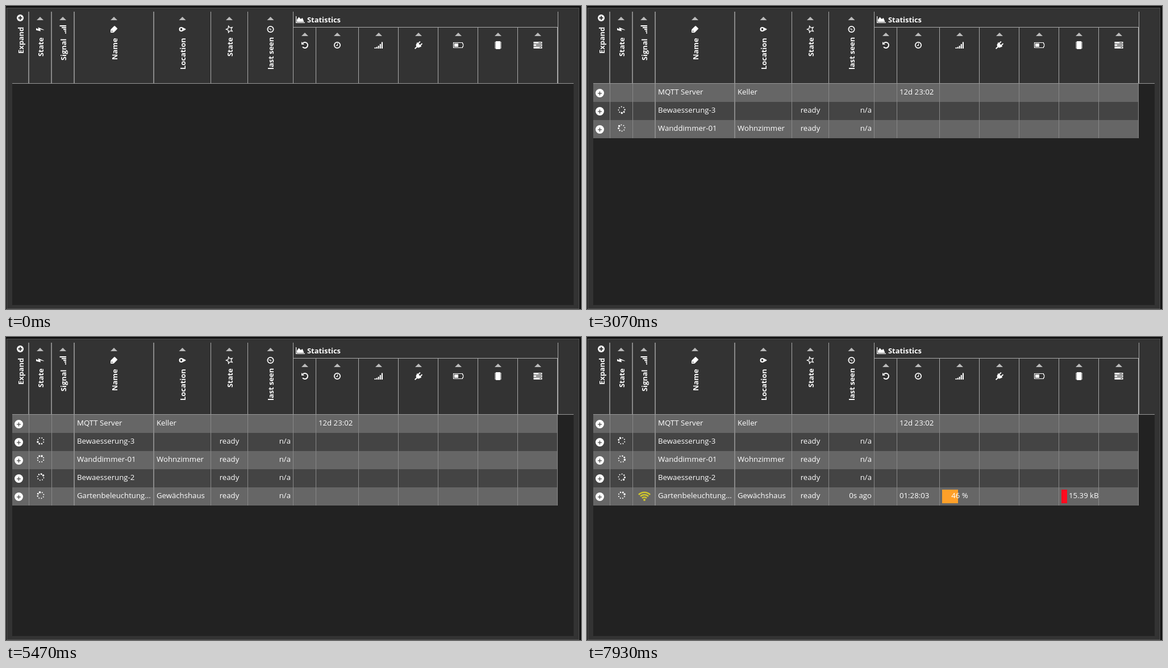
Recreate the animation shown at these times as an HTML page with a canvas. Size 1012 by 534 pixels, loop 8000 ms.

```html
<!DOCTYPE html>
<html lang="en">
<head>
<meta charset="utf-8">
<title>Device table</title>
<style>
html, body { margin: 0; width: 100%; height: 100%; overflow: hidden; background: #111; }
canvas { display: block; }
</style>
</head>
<body>
<canvas id="stage" width="1012" height="534"></canvas>
<script>
const ctx = document.getElementById('stage').getContext('2d');
const LOOP = 8000, TICK = 200 / 3, SPIN = 2000, TAU = Math.PI * 2;
const PLAIN = '13.2px "Open Sans", "Noto Sans", sans-serif';
const BOLD = 'bold 12.9px "Open Sans", "Noto Sans", sans-serif';
const ROW_H = 32, TOP = 137;
const LINES = [40, 80, 120, 260, 360, 425, 505, 545, 620, 690, 760, 830, 900, 970];
const UPDATE = 102; // tick at which live values arrive

// Each row appears at its own tick
const rows = [
  { at: 1, name: 'MQTT Server', place: 'Keller', uptime: '12d 23:02' },
  { at: 5, name: 'Bewaesserung-3', device: true },
  { at: 24, name: 'Wanddimmer-01', place: 'Wohnzimmer', device: true },
  { at: 51, name: 'Bewaesserung-2', device: true },
  { at: 57, name: 'Gartenbeleuchtung...', place: 'Gewächshaus', device: true, live: true }
];

function box(x, y, w, h, color) {
  ctx.fillStyle = color;
  ctx.fillRect(x, y, w, h);
}

function text(str, x, y, align = 'left', font = PLAIN) {
  ctx.font = font;
  ctx.textAlign = align;
  ctx.fillStyle = '#fff';
  ctx.fillText(str, x, y);
}

function dot(x, y, r, color = '#fff') {
  ctx.fillStyle = color;
  ctx.beginPath();
  ctx.arc(x, y, r, 0, TAU);
  ctx.fill();
}

function poly(points, color = '#fff') {
  ctx.fillStyle = color;
  ctx.beginPath();
  points.forEach(([x, y]) => ctx.lineTo(x, y));
  ctx.closePath();
  ctx.fill();
}

function stroke(path, width, color = '#fff') {
  ctx.strokeStyle = color;
  ctx.lineWidth = width;
  ctx.stroke(new Path2D(path));
}

function place(x, y, turn, draw) {
  ctx.save();
  ctx.translate(x, y);
  ctx.rotate(turn);
  draw();
  ctx.restore();
}

// Icons are drawn around their own centre
const icons = {
  bolt() {
    poly([[-1.4, -7], [2, -7], [.3, -2.8], [3.6, -3.5], [-1, 7], [-1.6, 6.5], [.1, .1], [-3.6, 1]]);
  },
  signal() {
    [2, 3, 5, 8, 11.5].forEach((h, i) => box(-7.5 + i * 3.1, 6 - h, 2.1, h, '#fff'));
  },
  tag() {
    ctx.fillStyle = '#fff';
    ctx.fill(new Path2D('M-6 -5Q-6 -6 -5 -6H-1.7Q-.6 -6 .2 -5.2L5.8 .4Q6.4 1 5.8 1.7L1.7 5.8Q1 6.4 .4 5.8L-5.2 .2Q-6 -.6 -6 -1.7Z'));
    dot(-3.5, -3.5, 1, '#333');
  },
  marker() {
    ctx.fillStyle = '#fff';
    ctx.fill(new Path2D('M-4 -2A4 4 0 0 1 4 -2Q4 -1 3.7 -.5L.8 5.5Q0 6.6 -.8 5.5L-3.7 -.5Q-4 -1 -4 -2Z'));
    dot(0, -2, 1.9, '#333');
  },
  star() {
    ctx.beginPath();
    for (let i = 0; i < 10; i++) {
      const r = i % 2 ? 2.8 : 6, a = i * TAU / 10 - TAU / 4;
      ctx.lineTo(Math.cos(a) * r, Math.sin(a) * r + .4);
    }
    ctx.closePath();
    ctx.strokeStyle = '#fff';
    ctx.lineWidth = 1.3;
    ctx.stroke();
  },
  clock() {
    stroke('M5.2 0A5.2 5.2 0 1 1 -5.2 0A5.2 5.2 0 1 1 5.2 0', 1.7);
    stroke('M.5 -3.2V.6H-2.3', 1.1);
  },
  plus() {
    dot(0, 0, 6);
    box(-3.5, -1, 7, 2, '#333');
    box(-1, -3.5, 2, 7, '#333');
  },
  undo() {
    stroke('M-3.7 -3.4A5 5 0 1 1 -3.9 3.1', 1.9);
    poly([[-6, -6], [-6, -1], [-1, -1]]);
  },
  plug() {
    ctx.rotate(TAU / 8);
    box(-5, -2.2, 10, 2, '#fff');
    ctx.fillStyle = '#fff';
    ctx.fill(new Path2D('M-4.2 -1.5H4.2V0A4.2 4.2 0 0 1 1 4.2V9H-1V4.2A4.2 4.2 0 0 1 -4.2 0Z'));
    stroke('M-2.5 -1.5V-6.6M2.5 -1.5V-6.6', 1.9);
  },
  battery() {
    stroke('M-8.5 -4.5H7.5V-2.2H8.7V2.2H7.5V4.5H-8.5Z', 1.1);
    box(-7, -3, 7, 6, '#fff');
  },
  chip() {
    box(-4, -7, 8, 14, '#fff');
    for (let y = -5.5; y < 6; y += 2) box(-6, y, 12, 1, '#fff');
  },
  server() {
    for (let i = 0; i < 3; i++) {
      const y = -6 + i * 4.3;
      box(-7.5, y, 15, 3.3, '#fff');
      box([1, -3, 3][i], y + 1.1, [5, 9, 3][i], 1.1, '#333');
    }
  },
  chart() {
    stroke('M-7.4 -6V5.4H8', 1.2);
    poly([[-6, 4], [-6, 0], [-2.6, -4.5], [.8, -1], [3.8, -3], [6.5, 4]]);
  }
};

function icon(name, x, y, turn = 0) {
  place(x, y, turn, icons[name]);
}

function arrow(x, y) {
  poly([[x - 6, y + 6], [x, y], [x + 6, y + 6]], '#bbb');
}

function upright(label, x, y) {
  place(x, y, -TAU / 4, () => text(label, 0, 0, 'left', BOLD));
}

function frame() {
  box(0, 0, 1012, 534, '#111');
  box(1, 3, 1008, 531, '#505050');
  box(2, 4, 1006, 529, '#333');
  box(11, TOP, 988, 390, '#222');
  box(11, 136, 988, 1, '#999');
}

function header() {
  LINES.forEach((x, i) => {
    if (i < 4) box(x - 1, 10, 2, 126, '#888');
    else if (i < 7) box(x, 10, 1, 126, '#aaa');
    else box(x, 38, 1, 98, '#aaa');
  });
  box(971, 10, 1, 126, '#aaa');
  box(506, 37, 465, 1, '#aaa');

  icon('plus', 25, 21, -TAU / 4);
  upright('Expand', 31, 84);
  [
    ['State', 'bolt', 60, 66, 89],
    ['Signal', 'signal', 100, 106, 96],
    ['Name', 'tag', 190, 196, 95],
    ['Location', 'marker', 310.5, 316, 112],
    ['State', 'star', 393, 399, 89],
    ['last seen', 'clock', 465.5, 471, 112]
  ].forEach(([label, glyph, x, base, y]) => {
    arrow(x, 19);
    icon(glyph, x, 41, -TAU / 4);
    upright(label, base, y);
  });

  icon('chart', 518, 24);
  text('Statistics', 530, 29, 'left', BOLD);
  [
    ['undo', 526], ['clock', 583], ['signal', 656], ['plug', 726],
    ['battery', 796], ['chip', 866], ['server', 936]
  ].forEach(([glyph, x]) => {
    arrow(x, 47);
    icon(glyph, x, 69);
  });
}

function spinner(x, y, age) {
  place(x, y, age / SPIN * TAU, () => {
    // Clockwise from the top right; the last three grow towards the largest
    [1.75, 1, 1, 1, 1, 1, 1.25, 1.5].forEach((r, i) => {
      const a = (i - 1) * TAU / 8;
      dot(Math.cos(a) * 5.5, Math.sin(a) * 5.5, r);
    });
  });
}

function wifi(x, y) {
  const color = '#cfc62d';
  ctx.strokeStyle = color;
  ctx.lineWidth = 2.6;
  [5.7, 10, 14.3].forEach(r => {
    ctx.beginPath();
    ctx.arc(x, y, r, -TAU * .375, -TAU * .125);
    ctx.stroke();
  });
  dot(x, y - 1, 2, color);
}

function row(item, i, tick) {
  const y = TOP + i * ROW_H, base = y + 19;
  const fresh = item.live && tick >= UPDATE;
  box(11, y, 960, ROW_H, i % 2 ? '#444' : '#666');
  LINES.forEach(x => {
    const wide = x === 120 || x === 260;
    box(wide ? x - 1 : x, y, wide ? 2 : 1, ROW_H, '#888');
  });

  dot(22.5, y + 16.5, 7.5);
  box(19, y + 16.4, 7, 1.2, '#444');
  box(21.9, y + 13.5, 1.2, 7, '#444');

  text(item.name, 125, base);
  if (item.place) text(item.place, 265, base);
  if (item.uptime) text(item.uptime, 550, base);
  if (item.device) {
    spinner(61, y + 14, (tick - item.at) * TICK);
    text('ready', 393, base, 'center');
    text(fresh ? '0s ago' : 'n/a', 501, base, 'right');
  }
  if (fresh) {
    wifi(101, y + 23);
    text('01:28:03', 550, base);
    box(625, y + 4, 28, 24, '#ffa029');
    text('46 %', 656, base, 'center');
    box(835, y + 4, 10, 24, '#ff0a1e');
    text('15.39 kB', 848, base);
  }
}

const start = performance.now();

function paint() {
  const time = (performance.now() - start) % LOOP;
  const tick = Math.floor((time + 4) / TICK);
  frame();
  header();
  rows.forEach((item, i) => {
    if (tick >= item.at && tick < LOOP / TICK) row(item, i, tick);
  });
  requestAnimationFrame(paint);
}
paint();
</script>
</body>
</html>
```
